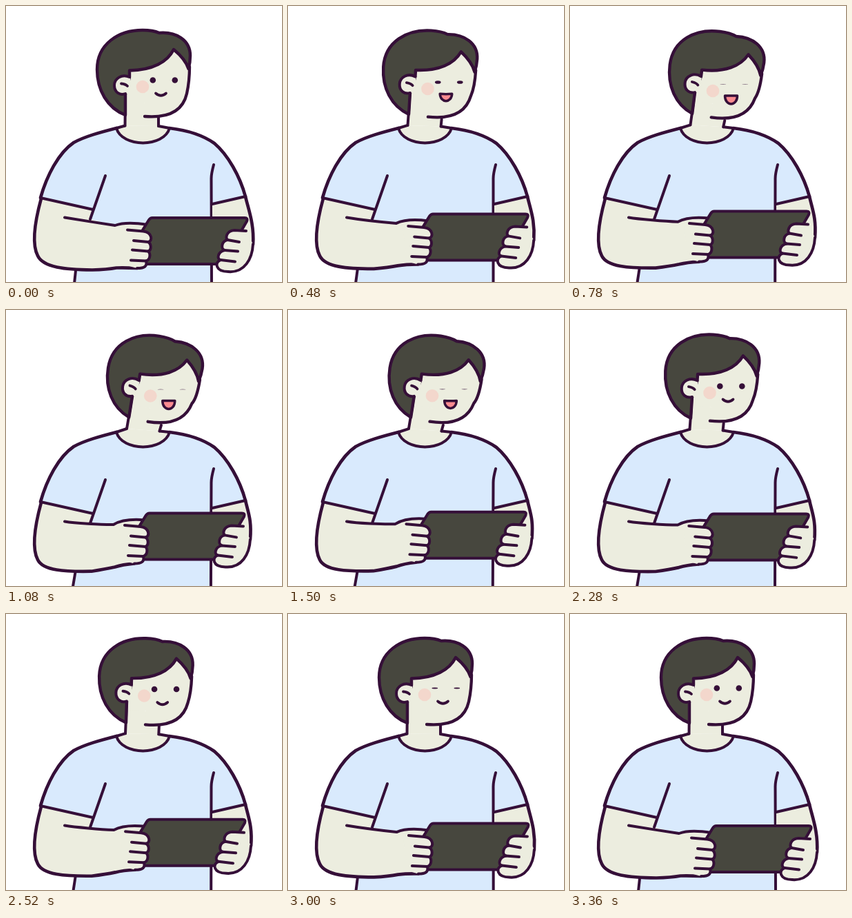
Animation of 400 by 400 pixels, one loop 3620 ms. Source, as an HTML page with a canvas:

```html
<!DOCTYPE html>
<html lang="en">
<head>
<meta charset="utf-8">
<title>Person with tablet</title>
<style>
html, body { margin: 0; width: 100%; height: 100%; overflow: hidden; background: #fff; }
canvas { display: block; width: 400px; height: 400px; }
</style>
</head>
<body>
<canvas id="stage" width="400" height="400"></canvas>
<script>
const ctx = document.getElementById('stage').getContext('2d');
const LOOP = 3620, STEP = 60, LAST = 3360;
const INK = '#350f38', SKIN = '#eceddf', SHIRT = '#d9eafd', HAIR = '#47473e';
const BLUSH = '#f3d7cc', TONGUE = '#fb8b90';
const OUTER = 4.7;
const TILT = 9 * Math.PI / 180, PIVOT = [192, 190];
const LIFT_KEYS = [[0, 0], [480, .4], [1080, .9], [1680, 1.04], [1980, 1], [2520, .66], [3000, .25], [3360, 0]];

const clamp = v => Math.max(0, Math.min(1, v));
const ease = (t, from, to) => (1 - Math.cos(Math.PI * clamp((t - from) / (to - from)))) / 2;
const mix = (a, b, k) => a + (b - a) * k;

// Catmull-Rom through [time, value] pairs
function curve(keys, t) {
  const slope = i => {
    const a = keys[Math.max(0, i - 1)], b = keys[Math.min(keys.length - 1, i + 1)];
    return (b[1] - a[1]) / (b[0] - a[0]);
  };
  let i = 0;
  while (i < keys.length - 2 && t > keys[i + 1][0]) i++;
  const [t0, v0] = keys[i], [t1, v1] = keys[i + 1], d = t1 - t0;
  const u = clamp((t - t0) / d), u2 = u * u, u3 = u2 * u;
  return v0 * (2 * u3 - 3 * u2 + 1) + v1 * (3 * u2 - 2 * u3)
    + d * (slope(i) * (u3 - 2 * u2 + u) + slope(i + 1) * (u3 - u2));
}

function fill(d, color) {
  ctx.fillStyle = color;
  ctx.fill(new Path2D(d));
}

function line(d, width = 4) {
  ctx.lineWidth = width;
  ctx.strokeStyle = INK;
  ctx.stroke(new Path2D(d));
}

function shape(d, color, width) {
  fill(d, color);
  line(d, width);
}

function oval(x, y, rx, ry, color) {
  ctx.fillStyle = color;
  ctx.beginPath();
  ctx.ellipse(x, y, rx, ry, 0, 0, 2 * Math.PI);
  ctx.fill();
}

function group(draw, dx, dy, angle = 0, [px, py] = [0, 0]) {
  ctx.save();
  ctx.translate(px + dx, py + dy);
  ctx.rotate(angle);
  ctx.translate(-px, -py);
  draw();
  ctx.restore();
}

function turned(x, y, angle) {
  const c = Math.cos(angle), s = Math.sin(angle), [px, py] = PIVOT;
  return `${px + (x - px) * c - (y - py) * s} ${py + (x - px) * s + (y - py) * c}`;
}

function drawBody(nod, lift) {
  const left = 'M160 177C137 183 114 189 98 198C76 213 59 246 50 278';
  const right = 'M237 177C262 180 285 187 302 199C322 216 339 247 347 276';
  const hip = 99 - 2.5 * lift, hem = 298 - 1.2 * lift;
  fill(`${left}L126 295L104 360L${hip} 400H${hem}L297 287L347 276C339 247 322 216 302 199C285 187 262 180 237 177Z`, SHIRT);
  line(`M103 365L${hip} 402M301 230Q297.5 243 297.5 250L${hem} 402`);

  const neckLeft = `${172.5 + 2.5 * nod} ${173.5 - 1.5 * nod}`;
  const neckRight = `${221 + 1.5 * nod} ${174 + 1.5 * nod}`;
  const angle = TILT * nod;
  shape(`M${neckRight}L237 177C229 205.5 168 205.5 160 177L${neckLeft}`, SKIN);
  fill(`M${turned(173, 127, angle)}L${neckLeft}L${neckRight}L${turned(221, 150, angle)}Z`, SKIN);
  line(`M${turned(173, 127, angle)}L${neckLeft}M${neckRight}L${turned(221, 162, angle)}`);
  line(left, OUTER);
  line(right, OUTER);
}

function drawArms(lift) {
  // weight tells how closely a point follows the hands
  const at = (x, y, weight) => `${x - 4.5 * lift * weight} ${y - 14 * lift * weight}`;
  const outer = `M51 279C43 308 36 343 46 362C${at(54, 379, .1)} ${at(86, 382, .2)} ${at(125, 382.5, .3)}Q${at(146, 382, .5)} ${at(160, 379.5, .55)}`;
  const top = `C${at(100, 309, 0)} ${at(138, 315, .3)} ${at(158, 318, .55)}`;
  const back = `Q${at(174, 312, .8)} ${at(205, 317, 1)}`;
  fill(`${outer}L${at(190, 380, 1)}L${at(205, 317, 1)}Q${at(174, 312, .8)} ${at(158, 318, .55)}L122 309L126 295L51 279Z`, SKIN);
  line(`${outer}Q${at(172, 379, .8)} ${at(190, 380, 1)}`, OUTER);
  line(`M85 306.5${top}${back}`);
  line('M50 278L126 295M144 246L122 309');

  const side = `C351 294 ${at(360, 316, .9)} ${at(358, 345, 1)}`;
  fill(`M299 287L347 276${side}L${at(320, 385, 1)}L${at(303, 340, 1)}L299 320Z`, SKIN);
  line(`M347 276${side}`, OUTER);
  line('M299 287L347 276');
}

function drawTablet() {
  shape('M212 307H346Q351 307 349 312L316 369Q313 374 308 374H201Q190 374 190 362V338Q191 333 196 328L207 310Q209 307 212 307Z', HAIR);
}

function drawHands() {
  const knuckles = 'M176 324.5L199 326.5C212 328 213 341 206 342C211 345 211 354 206 355.5C210 359 209 368 203 369.5C205 377 201 380 190 380';
  fill(knuckles + 'L175 376L168 330Z', SKIN);
  line(knuckles);
  line('M185 340L206 342M183 353.5L206 355.5M181 368.5L203 369.5');

  const fingers = 'M348 326L331 325C319 326 318 336 321 339C312 341 311 352 317 354C307 356 305 367 311 368C302 371 303 385 322 385C346 387 357 366 358 345';
  fill(fingers + 'Z', SKIN);
  line(fingers);
  line('M321 339L338 342M317 354L336 355.5M311 368L332 370.5');
}

function drawHead(nod) {
  // the jaw tucks in a little as the head tips
  const tuck = (x, y) => `${x - 2 * nod} ${y - 3 * nod}`;
  const jaw = `C266 104 264 118 ${tuck(262, 127)}C${tuck(257, 149)} ${tuck(239, 163)} 201 160`;
  fill(`M266 88${jaw}V140H175V85L243 60Z`, SKIN);
  const hair = 'M173 158C147 148 132 122 132 92C132 55 163 35 198 35Q213 35 222 39C246 37 267 49 267 72Q267 82 264.5 91Q260 77 243 63C234 81 213 93 179 93.5V103L173 128Z';
  shape(hair, HAIR, 4.4);
  line(`M266 88${jaw}`, 4.3);
  const ear = 'M179 103C168 98 157 105 157 115C157 125 165 130 173 127';
  fill(ear + 'L180 127V103Z', SKIN);
  line(ear);
  line('M167 112.5Q173 113 176 116', 3.8);
}

function drawFace(eyes, open) {
  oval(198, 117, 9.3, 9.3, BLUSH);
  for (const x of [212.8, 244.8]) oval(x, 107.5, 4.3, 4.3 * eyes, INK);

  const cx = 224.5, half = mix(7.5, 9, open), top = mix(126.5, 124, open);
  const dip = mix(6.5, 0, open), lower = top + mix(dip * 2 / 3, 16, open);
  const spread = mix(half / 3, half, open);
  const lip = `M${cx - half} ${top}Q${cx} ${top + dip} ${cx + half} ${top}`;
  if (open > .02) shape(`${lip}C${cx + spread} ${lower} ${cx - spread} ${lower} ${cx - half} ${top}Z`, TONGUE, 3.5);
  else line(lip, 3.7);
}

function render(t) {
  const nod = ease(t, 0, 1110) - ease(t, 1315, 3025);
  const lift = curve(LIFT_KEYS, t);
  const laugh = ease(t, 240, 560) - ease(t, 1440, 1740);
  const shut = ease(t, 360, 600) - ease(t, 1840, 2080)
    + ease(t, 2820, 3060) - ease(t, 3060, 3240);

  ctx.fillStyle = '#fff';
  ctx.fillRect(0, 0, 400, 400);
  ctx.lineCap = ctx.lineJoin = 'round';
  drawBody(nod, lift);
  drawArms(lift);
  group(() => { drawTablet(); drawHands(); }, -4.5 * lift, -14 * lift);
  group(() => drawHead(nod), 0, 0, TILT * nod, PIVOT);
  group(() => drawFace(mix(1, .08, clamp(shut)), laugh), 11.3 * nod, 7.5 * nod);
}

function tick() {
  const t = performance.now() % LOOP;
  render(Math.min(LAST, Math.floor(t / STEP) * STEP));
  requestAnimationFrame(tick);
}
tick();
</script>
</body>
</html>
```
